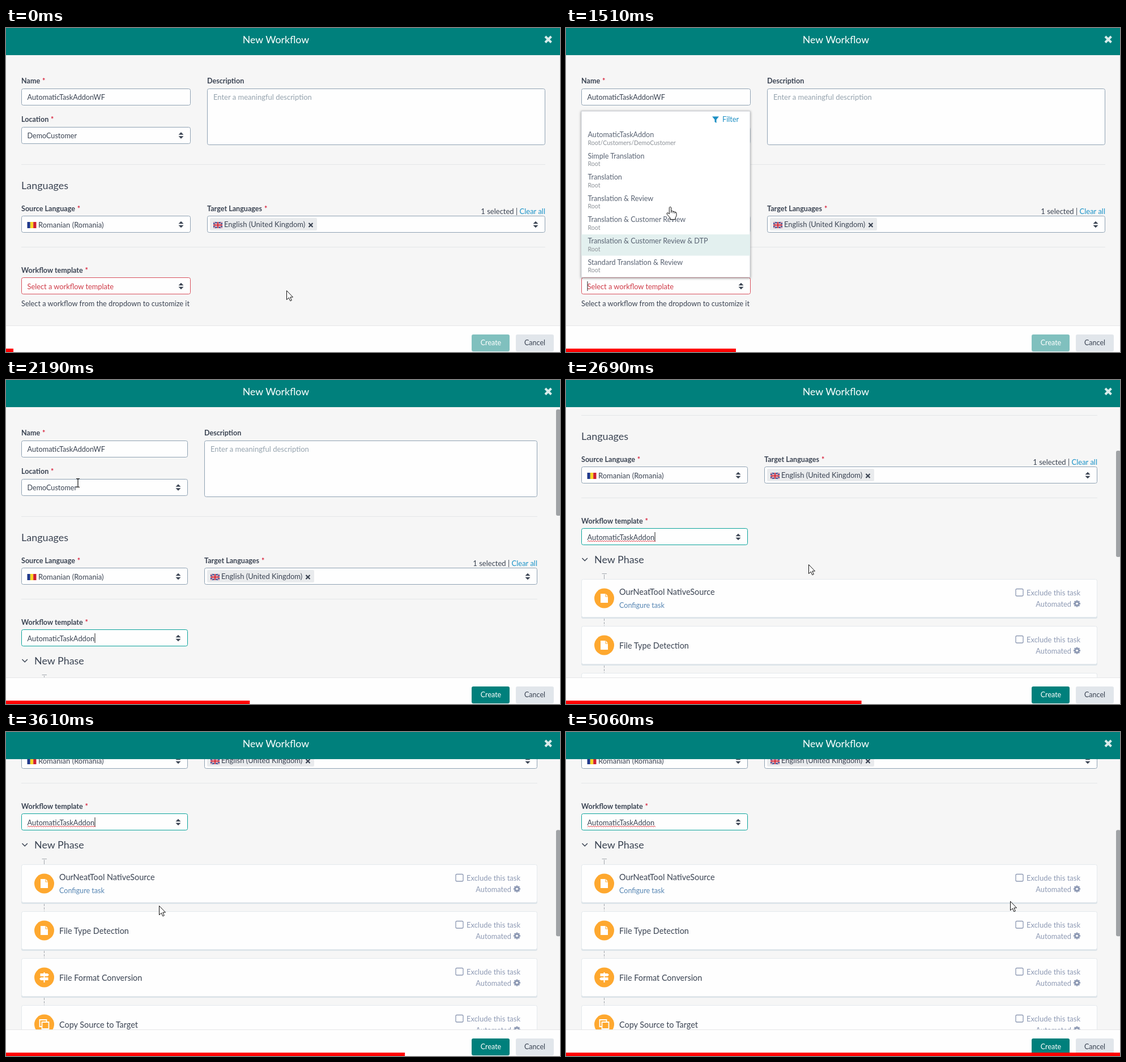
Recreate the animation shown at these times as an HTML page. Size 978 px wide and 573 px high, loop 5.13 s.

```html
<!DOCTYPE html>
<html lang="en">
<head>
<meta charset="utf-8">
<title>New Workflow</title>
<style>
  html, body { margin: 0; width: 100%; height: 100%; overflow: hidden; background: #f6f6f6; }
  svg { display: block; font-family: Lato, sans-serif; }
  text { white-space: pre; }
</style>
</head>
<body>
<svg id="stage" width="978" height="573" viewBox="0 0 978 573"></svg>
<script>
const LOOP = 5130, OPEN = 1200, SELECT = 1990;
const TEAL = '#00807c', INK = '#3b4453', MUTED = '#8e9ab4', EDGE = '#8fa2b3', RED = '#cf3b48';

// Runs of picture changes: first time, last time, count
const runs = [
  [0, 0, 1], [70, 550, 8], [620, 1100, 8], [1170, 1650, 8], [1720, 2190, 8], [2260, 2740, 8],
  [2810, 3280, 8], [3350, 3820, 8], [3910, 4430, 9], [4500, 4990, 8], [5060, 5060, 1]
];
const starts = runs.flatMap(([from, to, n]) => Array.from({ length: n },
  (_, i) => Math.floor((from + (to - from) * i / Math.max(1, n - 1)) / 10) * 10));

const pointerPath = [
  [0, 495, 464], [350, 420, 437], [550, 378, 444], [900, 316, 456], [1370, 316, 456],
  [1440, 230, 385], [1510, 184, 316], [1650, 145, 245], [1860, 128, 190], [2000, 127, 188],
  [2190, 127, 182], [2500, 428, 326], [2880, 428, 326], [3280, 56, 276], [3610, 270, 307],
  [3820, 300, 303], [4430, 600, 275], [4990, 759, 278], [5060, 784, 299]
];
const scrollPath = [[2400, 0], [2740, 225], [2870, 288], [2880, 288], [2950, 297]];

function along(path, t) {
  const i = path.findIndex(p => p[0] > t);
  if (i === 0) return path[0].slice(1);
  if (i < 0) return path[path.length - 1].slice(1);
  const a = path[i - 1], b = path[i], u = (t - a[0]) / (b[0] - a[0]);
  return a.slice(1).map((v, k) => v + (b[k + 1] - v) * u);
}

const text = (x, y, s, size = 13, fill = INK, more = '') =>
  `<text x="${x}" y="${y}" font-size="${size}" fill="${fill}" ${more}>${s}</text>`;
const rect = (x, y, w, h, fill, more = '') =>
  `<rect x="${x}" y="${y}" width="${w}" height="${h}" fill="${fill}" ${more}/>`;
const path = (d, fill, more = '') => `<path d="${d}" fill="${fill}" ${more}/>`;
const line = (d, stroke, width = 1, more = '') =>
  path(d, 'none', `stroke="${stroke}" stroke-width="${width}" ${more}`);
const at = (x, y, s) => `<g transform="translate(${x} ${y})">${s}</g>`;

const label = (x, y, s, required = true) => text(x, y,
  s + (required ? '<tspan dx="4" fill="#d9263f">*</tspan>' : ''), 12.6, INK, 'font-weight="700"');
const box = (x, y, right, h = 29, stroke = EDGE) =>
  rect(x + .5, y + .5, right - x - 1, h, '#fefefe', `rx="3" stroke="${stroke}"`);
const arrows = (x, y) => at(x, y, path('M-4.5-1.2L0-5.8 4.5-1.2ZM-4.5 1.2L0 5.8 4.5 1.2Z', INK));
const caret = (x, y) => rect(x, y, 1, 17, '#222');

const flagRomania = rect(0, 0, 5.3, 11, '#20398c') + rect(5.3, 0, 5.4, 11, '#f8d525') + rect(10.7, 0, 5.3, 11, '#d0202f');
const flagBritain = rect(0, 0, 16, 11, '#28408c') +
  line('M0 0L16 11M16 0L0 11', '#fff', 1.8) + line('M0 0L16 11M16 0L0 11', '#d0303f', .8) +
  line('M8 0V11M0 5.5H16', '#fff', 3.2) + line('M8 0V11M0 5.5H16', '#d0202f', 1.9);

const filePage = path('M-6.5-8H2V-2.5H6.5V8H-6.5ZM3-8L6.5-3.5H3Z', '#fff');
const signPost = path('M-1-9H1V-7H6L8.5-4.5 6-2H-7V-7H-1ZM-1-2H1V0H7V5H1V9H-1V5H-6L-8.5 2.5-6 0H-1Z', '#fff');
const copyPages = line('M-4-4H8V8H-4ZM-4 4H-8V-8H4V-4', '#fff', 1.8);
const gear = Array.from({ length: 8 }, (_, i) =>
  rect(-1.4, -6, 2.8, 4, MUTED, `transform="rotate(${i * 45})"`)).join('') +
  `<circle r="3.3" fill="none" stroke="${MUTED}" stroke-width="2.6"/>`;

const tasks = [
  ['OurNeatTool NativeSource', filePage], ['File Type Detection', filePage],
  ['File Format Conversion', signPost], ['Copy Source to Target', copyPages]
];
const templates = ['AutomaticTaskAddon', 'Simple Translation', 'Translation', 'Translation &amp; Review',
  'Translation &amp; Customer Review', 'Translation &amp; Customer Review &amp; DTP', 'Standard Translation &amp; Review'];

function taskCard([title, icon], i) {
  const configurable = i === 0;
  return at(0, 531 + i * 83,
    line(i ? 'M67.5-13V0' : 'M67.5-8V0M63.5-9.5H72', '#a3a8ae', 1, i ? 'stroke-dasharray="4 2"' : '') +
    rect(27, 1, 911, 69, '#dce4e9', 'rx="3"') +
    rect(27.5, .5, 910, 67, '#fefefe', 'rx="3" stroke="#e4e9ed"') +
    '<circle cx="67.5" cy="34" r="17.5" fill="#fea82f"/>' + at(67.5, 34, icon) +
    text(94, configurable ? 28 : 39.5, title, 14.4) +
    (configurable ? text(94, 51, 'Configure task', 12.6, '#5585b3') : '') +
    rect(794, 17.5, 13, 12.5, '#fff', `rx="2" stroke="${MUTED}" stroke-width="1.3"`) +
    text(908, 28.5, 'Exclude this task', 13, MUTED, 'text-anchor="end"') +
    text(892, 48.5, 'Automated', 12.8, MUTED, 'text-anchor="end"') + at(902, 43.5, gear));
}

function form(t) {
  const chosen = t >= SELECT;
  const right = chosen ? 938 : 952, fieldRight = chosen ? 321 : 326, col = chosen ? 350 : 355;
  const rule = y => rect(27, y, right - 27, 1, '#e4e6e8');
  let s = label(27, 98, 'Name') + box(27, 107, fieldRight) + text(37.5, 127, 'AutomaticTaskAddonWF', 12.7) +
    label(27, 166, 'Location') + box(27, 175, fieldRight) + text(37.5, 195, 'DemoCustomer', 12.6) + arrows(fieldRight - 17, 190) +
    label(col, 98, 'Description', false) + box(col, 107, right, 99) +
    text(col + 11, 127, 'Enter a meaningful description', 13, '#95a3ae') +
    rule(241) + text(27, 285, 'Languages', 18) +
    label(27, 324, 'Source Language') + box(27, 332, fieldRight) + at(37.5, 343, flagRomania) +
    text(57, 353, 'Romanian (Romania)') + arrows(fieldRight - 17, 347.5) +
    label(col, 324, 'Target Languages') +
    text(right, 329, '1 selected | <tspan fill="#1c94c9">Clear all</tspan>', 13, INK, 'text-anchor="end"') +
    box(col, 332, right) + rect(col + 5, 336, 189, 22, '#e9ebed', 'rx="2"') + at(col + 11, 343, flagBritain) +
    text(col + 30, 352, 'English (United Kingdom)') +
    line(`M${col + 179.5} 345l7 7m0-7l-7 7`, INK, 2.2) + arrows(right - 17, 347.5) +
    rule(387) + label(27, 433, 'Workflow template') +
    box(27, 441, fieldRight, 29, chosen ? '#0aa39b' : '#d8505c') + arrows(fieldRight - 17, 456.5);
  if (!chosen) {
    return s + text(37.5, 461.5, 'Select a workflow template', 12.8, RED) +
      (t >= 1030 ? caret(37.5, 448) : '') +
      text(27, 492, 'Select a workflow from the dropdown to customize it', 12.75);
  }
  const caretOn = t < 2340 || (t + 845) % 1060 < 530;
  s += text(37.5, 461.5, 'AutomaticTaskAddon', 12.8) + (caretOn ? caret(156.5, 448) : '');
  if (t >= 2260) s += line('M38 465' + 'l2-2 2 2'.repeat(30), '#e0303c', .9);
  return s + line('M28.500 494l4.700 4.700 4.700-4.700', INK, 1.5) + text(50, 503, 'New Phase', 17.9) +
    tasks.map(taskCard).join('');
}

function dropdown(t) {
  const hoverY = along(pointerPath, t - 70)[1];
  const hovered = Math.floor((hoverY - 177) / 37.6);
  return rect(27, 147, 298, 294, '#fff', 'stroke="#c9ced3" style="filter:drop-shadow(0 1px 2px #0006)"') +
    path('M258 156.500H270L265.500 162V168L262.500 166V162Z', '#1c8fc4') + text(276, 166, 'Filter', 12.8, '#1c8fc4') +
    templates.map((name, i) => at(0, 177 + i * 37.6,
      (i === hovered ? rect(27, 0, 298, 37.6, '#e3f0ef') : '') +
      text(38.5, 16, name, 12.6, '#586272') +
      text(38.5, 29.7, i ? 'Root' : 'Root/Customers/DemoCustomer', 10.6, '#8b9097'))).join('');
}

function pointer(t) {
  const outline = 'stroke="#111" stroke-linejoin="round"';
  let shape = path('M.5.500V16.500L4.300 13 6.800 18.700 9.300 17.600 6.800 12H11.500Z', '#fff', outline);
  if (t >= 850 && t < SELECT) {
    shape = path('M-1.700 1.500Q0-1 1.700 1.500V8Q4 6.500 5 8.500 7.500 7.500 8 9.500 11 9 11 12V16L9 20V22.500H0V20L-6 13Q-6.500 10-3.500 11L-1.700 13Z', '#fff', outline) +
      line('M1.700 8V11M5 8.500V11.500M8 9.500V12', '#111');
  } else if (t >= SELECT && t < 2300) {
    shape = line('M-3-7.500H-1L0-6.500 1-7.500H3M0-6.500V6.500M-3 7.500H-1L0 6.500 1 7.500H3', '#111', 1.2);
  }
  return at(...along(pointerPath, t), shape);
}

function draw(frame) {
  const t = starts[frame], chosen = t >= SELECT;
  const [scroll] = along(scrollPath, t);
  return rect(0, 0, 978, 573, '#f6f6f6') + at(0, -Math.round(scroll), form(t)) +
    (chosen ? rect(971, 52 + scroll * .408, 8, 188, '#a0a3a6', 'rx="3"') : '') +
    (t >= OPEN && !chosen ? dropdown(t) : '') +
    rect(0, 0, 978, 48, TEAL) + text(476.5, 27, 'New Workflow', 17.7, '#fff', 'text-anchor="middle"') +
    line('M952 15l10.500 10.500m0-10.500l-10.500 10.500', '#d9eceb', 4) +
    rect(0, 526, 978, 47, '#fefefe') + rect(0, 526, 978, 1, '#e5e6e8') +
    rect(822, 542, 67, 30, chosen ? TEAL : '#80c0be', 'rx="3"') +
    text(856, 561, 'Create', 12.5, '#fff', 'text-anchor="middle"') +
    rect(900, 542, 67, 30, '#e1e6eb', 'rx="3"') + text(933.5, 561, 'Cancel', 12.6, INK, 'text-anchor="middle"') +
    rect(0, 567, 978 * (frame + 1) / starts.length, 6, '#f00') + pointer(t);
}

const stage = document.getElementById('stage');
const began = performance.now();
let shown = -1;
function tick() {
  const t = (performance.now() - began) % LOOP;
  const frame = starts.filter(s => s <= t).length - 1;
  if (frame !== shown) stage.innerHTML = draw(shown = frame);
  requestAnimationFrame(tick);
}
tick();
</script>
</body>
</html>
```
